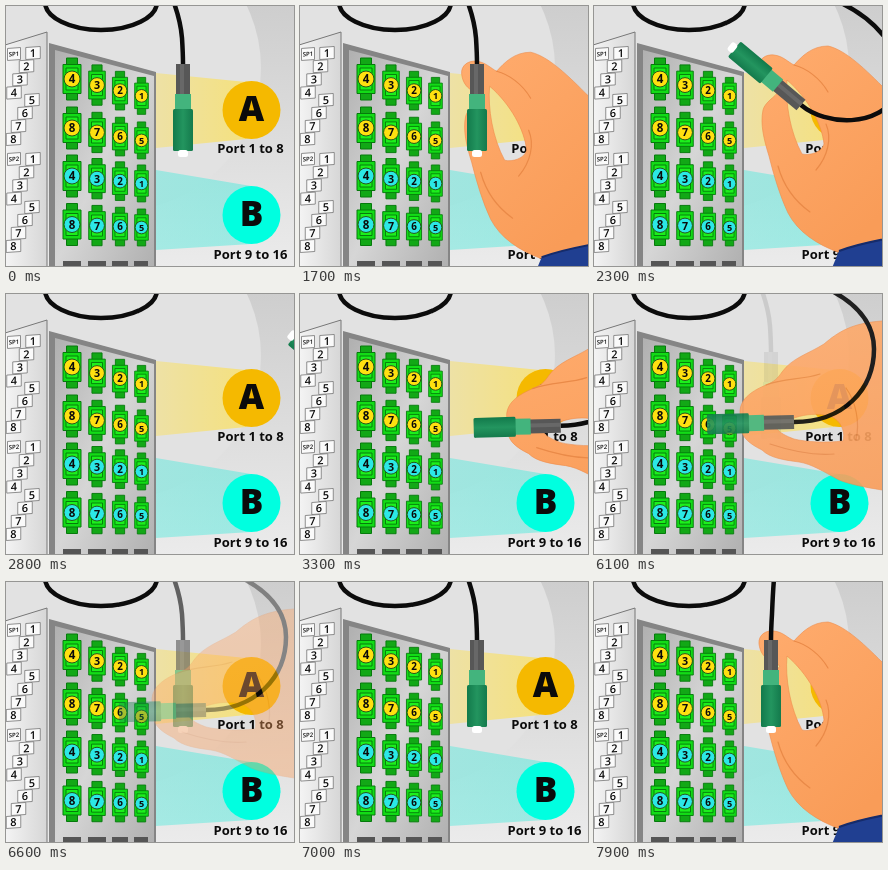
Animation, 288 px wide and 260 px high, one loop 8 s. Source, as an HTML page:

```html
<!DOCTYPE html>
<html lang="en">
<head>
<meta charset="utf-8">
<title>Connecting a fibre plug</title>
<style>
html, body { margin: 0; width: 100%; height: 100%; overflow: hidden; background: #d8d8d8; }
svg { display: block; width: 288px; height: 260px; }
text { font-family: "Open Sans", "Noto Sans", sans-serif; text-anchor: middle; fill: #0b0b0b; }
.cable { fill: none; stroke: #0c0c0c; stroke-width: 4.5; }
.skin { fill: url(#skin); fill-rule: evenodd; stroke: #ee8c4a; stroke-width: .6; }
.crease { fill: none; stroke: #ea8a48; stroke-width: 1.2; stroke-linecap: round; }
</style>
</head>
<body>
<svg viewBox="0 0 288 260">
  <defs>
    <linearGradient id="wall" x2="0" y2="1">
      <stop stop-color="#cecece"/><stop offset="1" stop-color="#ebebeb"/>
    </linearGradient>
    <linearGradient id="side">
      <stop stop-color="#f4f4f4"/><stop offset="1" stop-color="#d6d6d6"/>
    </linearGradient>
    <linearGradient id="face" y2="1">
      <stop stop-color="#b0b0b0"/><stop offset=".5" stop-color="#d6d6d6"/><stop offset="1" stop-color="#b0b0b0"/>
    </linearGradient>
    <linearGradient id="beamA">
      <stop stop-color="#ffe04a" stop-opacity=".4"/><stop offset="1" stop-color="#ffe04a" stop-opacity=".65"/>
    </linearGradient>
    <linearGradient id="beamB">
      <stop stop-color="#3febdc" stop-opacity=".4"/><stop offset="1" stop-color="#3febdc" stop-opacity=".45"/>
    </linearGradient>
    <linearGradient id="skin" x2=".6" y2="1">
      <stop stop-color="#ffac6e"/><stop offset="1" stop-color="#f99c58"/>
    </linearGradient>
    <linearGradient id="jacket">
      <stop stop-color="#127a4b"/><stop offset=".5" stop-color="#23955f"/><stop offset="1" stop-color="#147a4c"/>
    </linearGradient>
    <g id="plug">
      <rect x="-7" width="14" height="31" fill="#575757"/>
      <rect x="-3" width="4" height="31" fill="#686868"/>
      <rect x="-8" y="30" width="16" height="16" fill="#43b47d"/>
      <rect x="-10" y="45" width="20" height="42" rx="1.5" fill="url(#jacket)"/>
    </g>
    <rect id="cap" x="-5" y="86" width="10" height="7" rx="2.5" fill="#fff"/>
  </defs>

  <rect width="288" height="260" fill="url(#wall)"/>
  <circle cx="112" cy="62" r="143" fill="#e2e2e2"/>
  <path d="M150 67L240 76V133L150 142Z" fill="url(#beamA)"/>
  <path d="M150 164L245 180V238L150 244Z" fill="url(#beamB)"/>

  <path d="M-1 39L41 26V261H-1Z" fill="url(#side)" stroke="#777"/>
  <path d="M43 37L150 66V260H43Z" fill="#858585"/>
  <path d="M49 44L148 70V260H49Z" fill="url(#face)"/>
  <path d="M57 255h18v5h-18zM82 255h18v5h-18zM106 255h16v5h-16zM128 255h14v5h-14z" fill="#555"/>
  <g id="tags"></g>
  <g id="ports"></g>
  <g id="badges"></g>

  <ellipse class="cable" cx="95" cy="-4" rx="56" ry="28"/>
  <g id="hang">
    <path class="cable"/>
    <use href="#plug"/>
    <use href="#cap"/>
  </g>
  <g id="act">
    <g id="grab">
      <path class="skin" d="M165 62C164 53 172 48 180 49C189 50 194 56 200 59C208 50 218 40 234 40C252 44 272 64 292 84L300 94V240L246 247C222 238 204 226 194 207C186 190 180 170 175 150C170 134 166 118 169 104C171 96 180 92 186 84C180 80 167 78 165 62Z
        M193 74C191 96 196 126 208 148C216 150 228 146 230 138C228 118 214 92 193 74Z"/>
      <path class="crease" d="M200 59C212 62 226 72 234 86M232 118C238 132 234 150 222 164M184 160C190 182 202 196 216 206"/>
      <path d="M238 262L245 245C258 240 274 236 302 231V270H238Z" fill="#203f91"/>
      <path d="M245 245C258 240 274 236 302 231" stroke="#152b6b" stroke-width="2" fill="none"/>
    </g>
    <g id="pinch">
      <path class="skin" d="M146 118C146 104 160 96 172 91C180 88 184 84 188 78C198 64 214 60 230 50C244 38 258 29 288 27H460V204C360 202 310 199 288 196C270 193 258 191 245 186C230 178 218 170 205 168C190 166 176 164 168 156C156 150 148 144 147 134Z
        M182 134C196 122 222 116 240 124C249 130 251 140 249 147C232 149 212 148 200 145C192 142 186 139 182 134Z"/>
      <path class="crease" d="M172 91C190 84 208 86 226 80M176 150C194 156 216 162 240 160M252 94C262 108 266 128 262 146"/>
    </g>
    <path class="cable"/>
    <use href="#plug"/>
    <use href="#cap"/>
  </g>
</svg>
<script>
const $ = s => document.querySelector(s);
const clamp = k => Math.max(0, Math.min(1, k));
const span = (t, a, b) => clamp((t - a) / (b - a));
const smooth = k => k * k * (3 - 2 * k);
const mix = (a, b, k) => a.map((v, i) => v + (b[i] - v) * k);
const label = (x, y, size, s, weight = 700) =>
  `<text x="${x}" y="${y}" font-size="${size}" font-weight="${weight}">${s}</text>`;

// Number tags on the left panel
const tagX = [27, 20.5, 14, 8, 26, 19, 12.5, 7.5];
const tag = (x, y, w, h, size, s) => `<g transform="translate(${x} ${y}) skewY(-4)">
  <rect x="${-w / 2}" y="${-h / 2}" width="${w}" height="${h}" fill="#fafafa" stroke="#777" stroke-width=".8"/>
  ${label(0, size * .36, size, s, 600)}</g>`;
let out = '';
[[47, 94, 48], [153, 201, 153]].forEach(([y, y2, head], g) => {
  out += tag(8, head, 13, 12, 6, 'SP' + (g + 1));
  tagX.forEach((x, i) => out += tag(x, i < 4 ? y + i * 13.2 : y2 + (i - 4) * 13, 14.5, 12, 11, i + 1));
});
$('#tags').innerHTML = out;

// Ports narrow towards the right
const colX = [66, 91, 114, 135.5];
const rows = [[73, 90], [122, 134.5], [170, 177.5], [218.5, 221.5]];
out = '';
rows.forEach(([y0, y1], r) => colX.forEach((x, c) => {
  const y = y0 + (y1 - y0) * (x - 66) / 70;
  out += `<g transform="translate(${x} ${y})">
    <g transform="scale(${1 - c * .08} ${1 - c * .04})" stroke="#067a0c">
      <path d="M-5.500 -21H5.500V21H-5.500Z" fill="#12a816"/>
      <path d="M-9 -14.500H9V14.500H-9Z" fill="#12dc16"/>
      <path d="M-6 -11H6V11H-6Z" fill="#1cf01c"/>
    </g>
    <circle r="${8 - c * .55}" fill="${r < 2 ? '#ffe010' : '#2be8e6'}" stroke="#26551a"/>
    ${label(0, 4.2 - c * .2, 11.5 - c * .8, r % 2 ? 8 - c : 4 - c)}</g>`;
}));
$('#ports').innerHTML = out;

$('#badges').innerHTML = [['A', 104, '#f5b900', 'Port 1 to 8', 147], ['B', 209, '#00ffe0', 'Port 9 to 16', 253]]
  .map(([s, y, fill, name, base]) => `<circle cx="245.500" cy="${y}" r="29" fill="${fill}"/>` +
    label(245.5, y + 10.5, 35, s, 800) + label(244.5, base, 13, name)).join('');

// Pose: plug x, y, angle, then the control points of its cable
const hanging = [177, 58, 0, 177, 50, 176.5, 40, 176, 32, 175, 20, 172, 8, 168, -3];
const gripped = [177, 58, 0, 177, 50, 177.5, 40, 178, 32, 178.5, 20, 179, 8, 180, -3];
const lifted = [207, 99, 130, 232, 120, 285, 122, 303, 88, 318, 55, 285, 15, 247, -3];
const plugged = [200, 128, 88.5, 250, 128, 280, 95, 280, 55, 280, 28, 262, 10, 238, -3];

function pose(root, p) {
  const [x, y, angle, ...c] = p;
  root.querySelector('.cable').setAttribute('d', `M${x} ${y}C${c.slice(0, 6)}C${c.slice(6)}`);
  for (const el of root.querySelectorAll('use'))
    el.setAttribute('transform', `translate(${x} ${y}) rotate(${angle})`);
}
const show = (el, on) => el.style.display = on ? '' : 'none';
const move = (el, x, y = 0) => el.setAttribute('transform', `translate(${x} ${y})`);

const hang = $('#hang'), act = $('#act'), grab = $('#grab'), pinch = $('#pinch');
const cap = act.querySelector('[href="#cap"]');
pose(hang, hanging);

function draw(t) {
  const fading = t >= 6000 && t < 7000;
  const u = t >= 7000 ? t - 5800 : t;
  const idle = u < 1200;
  const pinching = u >= 2900;
  show(act, !idle);
  show(hang, idle || fading);
  show(grab, !pinching);
  show(pinch, pinching);
  show(cap, !pinching);
  const back = fading ? (t - 6000) / 1000 : 0;
  act.style.opacity = 1 - back;
  hang.style.opacity = fading ? back : 1;
  if (idle) return;
  if (pinching) {
    const dx = 160 * (1 - span(u, 2900, 3800)) ** 1.65;
    pose(act, plugged);
    move(act, dx, dx * .06);
  } else {
    const away = (1 - span(u, 1200, 1800)) ** 3;
    const grip = smooth(span(u, 1700, 2100));
    move(grab, 140 * away - 4 * (1 - grip), 50 * away + 6 * (1 - grip));
    pose(act, mix(mix(hanging, gripped, grip), lifted, smooth(span(u, 2100, 2300))));
    move(act, 165 * smooth(span(u, 2400, 2900)));
  }
}

function tick() {
  draw(Math.floor(performance.now() % 8000 / 100) * 100);
  requestAnimationFrame(tick);
}
tick();
</script>
</body>
</html>
```
